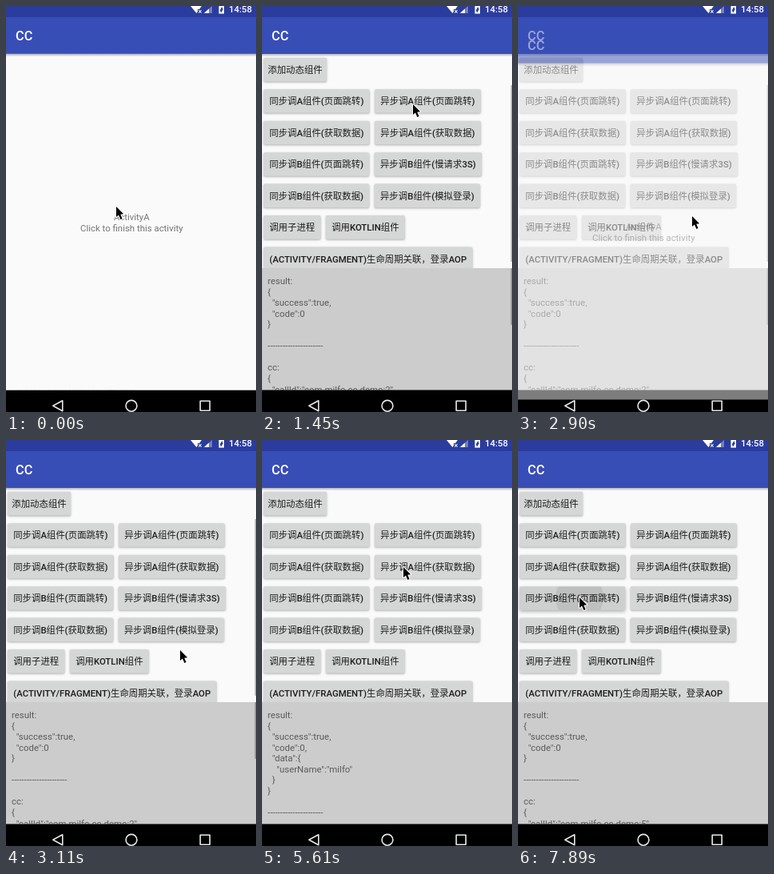
An HTML page with a canvas that plays this animation: 313 px wide and 508 px high, repeating every 8000 ms.

```html
<!DOCTYPE html>
<html lang="zh">
<head>
<meta charset="utf-8">
<title>CC demo</title>
<style>
html, body { margin: 0; width: 100%; height: 100%; overflow: hidden; background: #000; }
canvas { display: block; width: 313px; height: 508px; }
</style>
</head>
<body>
<canvas id="stage"></canvas>
<script>
const W = 313, H = 508, LOOP = 8000;
const TICK = 207.7, LEAD = 12.5; // the screen refreshes in even ticks
const BAR_TOP = 14, BAR_END = 59.6, PANEL_TOP = 328, NAV_TOP = 480.5;
const FONT_SIZE = 11.41, LINE = 13.55;
const FAMILY = 'Roboto, "Noto Sans CJK SC", "Noto Sans CJK", sans-serif';
const BLUE = '#384eb7', DARK_BLUE = '#2b3c9f', PAPER = '#fafafa';

const canvas = document.getElementById('stage');
const ctx = canvas.getContext('2d');
const dpr = window.devicePixelRatio || 1;
canvas.width = W * dpr;
canvas.height = H * dpr;

const page = '(页面跳转)', data = '(获取数据)';
const ROWS = [
  { labels: ['添加动态组件'], pad: 5.3 },
  { labels: ['同步调A组件' + page, '异步调A组件' + page] },
  { labels: ['同步调A组件' + data, '异步调A组件' + data] },
  { labels: ['同步调B组件' + page, '异步调B组件(慢请求3S)'] },
  { labels: ['同步调B组件' + data, '异步调B组件(模拟登录)'] },
  { labels: ['调用子进程', '调用KOTLIN组件'] },
  { labels: ['(ACTIVITY/FRAGMENT)生命周期关联，登录AOP'] }
];

const RULE = '-'.repeat(22);
const pageResult = id => ['result:', '{', '  "success":true,', '  "code":0', '}', '', RULE, '',
  'cc:', '{', `  "callId":"com.milfo.cc.demo:${id}",`];
const dataResult = name => ['result:', '{', '  "success":true,', '  "code":0,', '  "data":{',
  `    "userName":"${name}"`, '  }', '}', '', RULE];

// All times below are in ticks.
const TAPS = [
  { at: 6, label: ROWS[1].labels[1], result: pageResult(2) },
  { at: 21, label: ROWS[2].labels[0], result: dataResult('milfo') },
  { at: 30, label: ROWS[2].labels[1], result: dataResult('milfo miss you') },
  { at: 38, label: ROWS[3].labels[0], result: pageResult(5) }
];

const HOME = { x: 138, y: 251 };
const MOVES = [
  { from: 2, to: 6, x: 189, y: 123 },
  { from: 9, to: 12, x: 218, y: 263 },
  { from: 16, to: 19, x: 57, y: 157 },
  { from: 21, to: 23, x: 85, y: 211 },
  { from: 23, to: 27, x: 177, y: 159 },
  { from: 33, to: 34, x: 139, y: 188 },
  { from: 34, to: 36, x: 77, y: 197 }
];

const clamp = v => Math.min(1, Math.max(0, v));
const easeOut = p => 1 - (1 - p) ** 2;

function pointerAt(tick) {
  return MOVES.reduce((pos, { from, to, x, y }) => {
    const p = easeOut(clamp((tick - from) / (to - from)));
    return { x: pos.x + (x - pos.x) * p, y: pos.y + (y - pos.y) * p };
  }, HOME);
}

function rect(x, y, w, h, color) {
  ctx.fillStyle = color;
  ctx.fillRect(x, y, w, h);
}

function text(str, x, y, color, { size = FONT_SIZE, weight = 400, align = 'left' } = {}) {
  ctx.font = `${weight} ${size}px ${FAMILY}`;
  ctx.textAlign = align;
  ctx.fillStyle = color;
  ctx.fillText(str, x, y);
}

function poly(...points) {
  ctx.beginPath();
  points.forEach(([x, y]) => ctx.lineTo(x, y));
  ctx.closePath();
}

function fillPoly(color, ...points) {
  poly(...points);
  ctx.fillStyle = color;
  ctx.fill();
}

function disc(x, y, r) {
  ctx.beginPath();
  ctx.arc(x, y, r, 0, Math.PI * 2);
}

function clipTo(x, y, w, h, draw) {
  ctx.save();
  ctx.beginPath();
  ctx.rect(x, y, w, h);
  ctx.clip();
  draw();
  ctx.restore();
}

function appBar() {
  const shade = ctx.createLinearGradient(0, BAR_END, 0, BAR_END + 4);
  shade.addColorStop(0, 'rgba(0,0,0,.3)');
  shade.addColorStop(1, 'rgba(0,0,0,0)');
  rect(0, BAR_END, W, 4, shade);
  rect(0, BAR_TOP, W, BAR_END - BAR_TOP, BLUE);
  text('CC', 12, 43.3, '#fff', { size: 16.3, weight: 500 });
}

function button(label, x, y, w, touch) {
  const h = 29.6;
  ctx.save();
  ctx.shadowColor = 'rgba(0,0,0,.3)';
  ctx.shadowBlur = (touch ? 4 : 2.5) * dpr;
  ctx.shadowOffsetY = (touch ? 2 : 1) * dpr;
  ctx.beginPath();
  ctx.roundRect(x, y, w, h, 1.7);
  ctx.fillStyle = '#d5d6d6';
  ctx.fill();
  ctx.restore();
  if (touch) {
    clipTo(x, y, w, h, () => {
      rect(x, y, w, h, 'rgba(0,0,0,.03)');
      disc(touch.x, touch.y, 30);
      ctx.fillStyle = 'rgba(0,0,0,.08)';
      ctx.fill();
    });
  }
  text(label, x + w / 2, y + 19.1, 'rgba(0,0,0,.87)', { weight: 500, align: 'center' });
}

function buttonRows(tick, pointer) {
  const tap = TAPS.find(({ at }) => at === tick);
  ROWS.forEach(({ labels, pad = 7.2 }, row) => {
    let x = 2;
    labels.forEach(label => {
      ctx.font = `500 ${FONT_SIZE}px ${FAMILY}`;
      const w = ctx.measureText(label).width + 2 * pad;
      button(label, x, 64.8 + row * 39.45, w, tap && tap.label === label ? pointer : null);
      x += w + 6.5;
    });
  });
}

function listScreen(tick, pointer) {
  const panelHeight = NAV_TOP - PANEL_TOP;
  rect(0, BAR_END, W, PANEL_TOP - BAR_END, PAPER);
  clipTo(0, BAR_END, W, PANEL_TOP - BAR_END, () => buttonRows(tick, pointer));
  rect(0, PANEL_TOP, W, panelHeight, '#cbcccb');
  const done = TAPS.filter(({ at }) => at <= tick).pop();
  const lines = done ? done.result : pageResult(1);
  clipTo(0, PANEL_TOP, W, panelHeight, () => lines.forEach((line, i) =>
    text(line, 7, 348 + i * LINE, 'rgba(0,0,0,.56)')));
  if (tick < 21) {
    rect(311.5, 99, 1.5, 221, 'rgba(0,0,0,.28)');
    rect(311.5, PANEL_TOP, 1.5, 71, 'rgba(0,0,0,.28)');
  }
  appBar();
}

function activityScreen(shift, alpha) {
  const lines = ['ActivityA', 'Click to finish this activity'];
  ctx.save();
  ctx.globalAlpha = alpha;
  ctx.translate(0, shift);
  rect(0, BAR_END, W, NAV_TOP - BAR_END, PAPER);
  lines.forEach((line, i) =>
    text(line, W / 2 + 0.8, 268 + i * LINE, '#757575', { align: 'center' }));
  appBar();
  ctx.restore();
}

function statusBar() {
  rect(0, 0, W, BAR_TOP, DARK_BLUE);
  fillPoly('#fff', [231, 0], [245, 0], [238.5, 9]);
  fillPoly('rgba(255,255,255,.35)', [258, 0], [258, 9], [248, 9]);
  fillPoly('#fff', [254, 3.5], [254, 9], [248, 9]);
  rect(240, 4, 6, 6, DARK_BLUE);
  text('×', 243, 9.5, '#fff', { size: 9, weight: 500, align: 'center' });
  rect(266.5, 0, 6.5, 9.6, '#fff');
  fillPoly(DARK_BLUE, [270.5, 1], [267.8, 5.2], [269.2, 8.4], [271.7, 4.2]);
  text('14:58', 279, 8.1, '#fff', { weight: 500 });
}

function navIcons() {
  const y = 500.3, r = 6.5;
  ctx.strokeStyle = '#e8e8e8';
  ctx.lineWidth = 1.6;
  ctx.lineJoin = 'round';
  poly([58.8, y], [70.8, y - r], [70.8, y + r]);
  ctx.stroke();
  disc(157, y, 6.9);
  ctx.stroke();
  ctx.strokeRect(243.2, y - 6, 12, 12);
}

function arrow({ x, y }) {
  ctx.save();
  ctx.translate(x, y);
  poly([0, 0], [0, 13], [3, 10.5], [5.4, 16], [7.6, 15], [5.3, 9.7], [9.2, 9.3]);
  ctx.lineJoin = 'round';
  ctx.lineWidth = 2;
  ctx.strokeStyle = '#fff';
  ctx.stroke();
  ctx.fillStyle = '#000';
  ctx.fill();
  ctx.restore();
}

function render(time) {
  const tick = Math.floor((time + LEAD) / TICK);
  const pointer = pointerAt(tick);
  ctx.setTransform(dpr, 0, 0, dpr, 0, 0);
  rect(0, 0, W, H, '#000');
  listScreen(tick, pointer);
  if (tick < 2 || (tick > 8 && tick < 14)) activityScreen(0, 1);
  else if (tick === 8) activityScreen(1, 1);
  else if (tick === 14) activityScreen(12, 0.5);
  statusBar();
  navIcons();
  arrow(pointer);
}

const start = performance.now();
function loop() {
  render((performance.now() - start) % LOOP);
  requestAnimationFrame(loop);
}
loop();
</script>
</body>
</html>
```
